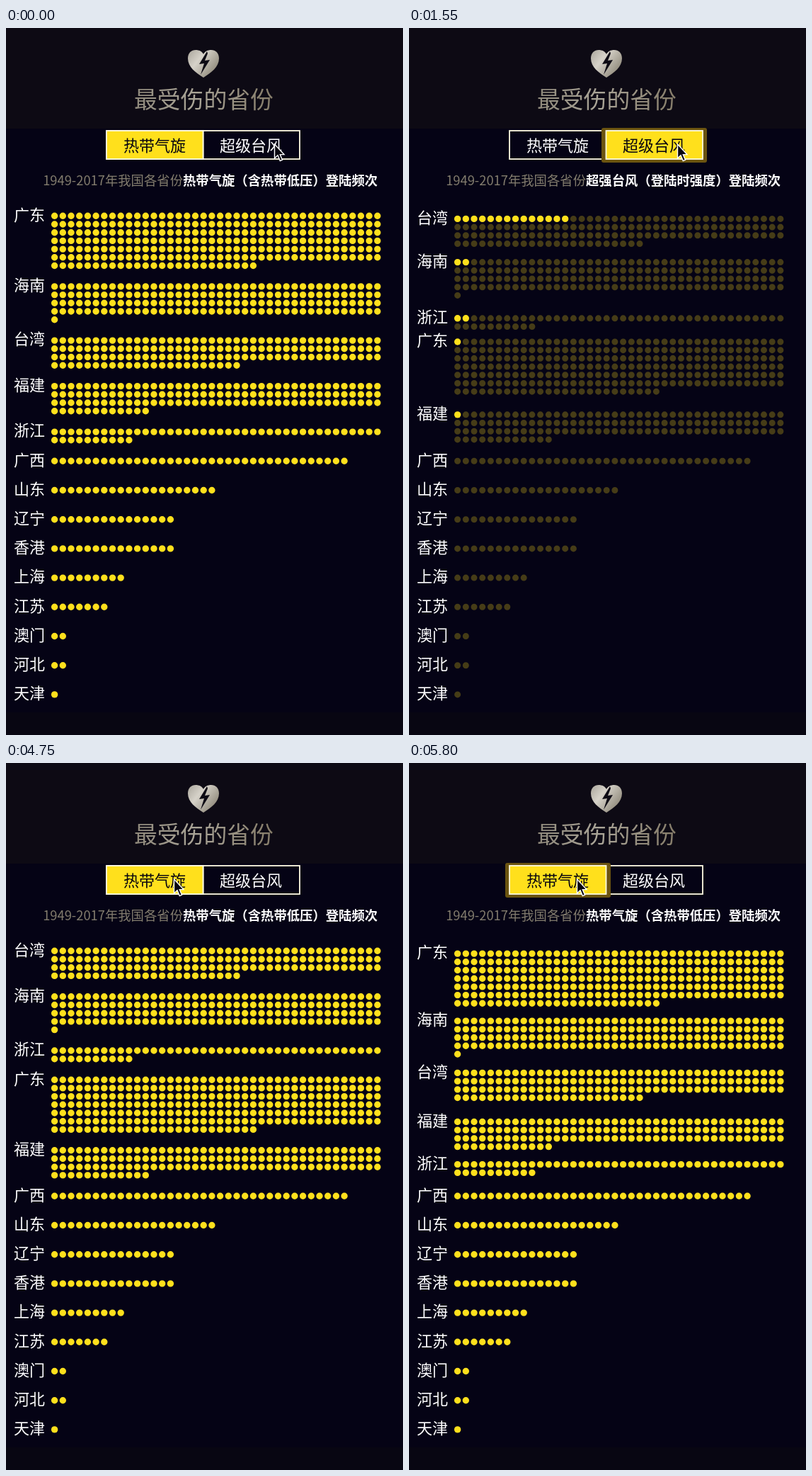
Animation of 561 by 998 pixels, one loop 7.8 s. Source, as an HTML page:

```html
<!DOCTYPE html>
<html lang="zh-CN">
<head>
<meta charset="utf-8">
<title>最受伤的省份</title>
<style>
  html, body { margin: 0; width: 100%; height: 100%; overflow: hidden; background: #050315; }
  svg { display: block; width: 100%; height: 100%; }
  text { font-family: "Noto Sans CJK SC", "Noto Sans CJK", "Noto Sans", sans-serif; font-size: 22px; fill: #fff; }
  .title { font-size: 32.8px; fill: url(#silver); }
  .tab { font-weight: 500; text-anchor: middle; }
  .years { font-size: 18.35px; fill: #827c6d; text-anchor: end; }
  .topic { font-size: 18.35px; font-weight: 700; }
  .box { fill: #050315; stroke: #fffbe2; stroke-width: 1.8; }
  .glow { fill: #6b5410; }
  .dots { fill: none; stroke: #ffe01c; stroke-linecap: round; stroke-width: 9.4; }
  .dim { stroke-opacity: .26; stroke-width: 9; }
</style>
</head>
<body>
<svg viewBox="0 0 561 998" preserveAspectRatio="none">
  <defs>
    <linearGradient id="silver">
      <stop offset="0" stop-color="#8f897b"/>
      <stop offset=".45" stop-color="#aaa598"/>
      <stop offset="1" stop-color="#857c69"/>
    </linearGradient>
    <linearGradient id="metal" x2="1" y2=".7">
      <stop offset="0" stop-color="#aaa69c"/>
      <stop offset=".4" stop-color="#d6d2c9"/>
      <stop offset="1" stop-color="#8b8576"/>
    </linearGradient>
  </defs>
  <rect width="561" height="998" fill="#050315"/>
  <rect width="561" height="142" fill="#0d0a14"/>
  <rect y="966" width="561" height="32" fill="#080612"/>

  <path fill="url(#metal)" d="M279 70C268 63 257 55 257 43C257 35 262 31 268 31C273 31 277 33 279 37C281 33 285 31 290 31C296 31 301 35 301 43C301 55 290 63 279 70Z"/>
  <path fill="#0d0a14" d="M284 33L273 51L280 50L275 66L288 45L281 46L285 36Z"/>
  <text class="title" x="181" y="113">最受伤的省份</text>

  <rect class="box" x="142" y="145" width="136.5" height="40"/>
  <rect class="box" x="278.5" y="145" width="136.5" height="40"/>
  <rect class="glow" id="glow" y="141" width="149" height="49" rx="3"/>
  <rect class="box" id="active" y="145" width="136.5" height="40" style="fill:#ffe01c"/>
  <text class="tab" id="tab0" x="210" y="174">热带气旋</text>
  <text class="tab" id="tab1" x="346" y="174">超级台风</text>

  <text class="years" x="250" y="222">1949-2017年我国各省份</text>
  <text class="topic" id="topic" x="250" y="222"></text>

  <g id="rows"></g>
  <path id="cursor" d="M0 0V20L4.5 15.8L7.8 23.6L11 22.2L7.8 14.6H13.5Z" fill="#08060f" stroke="#fff" stroke-width="1.4"/>
</svg>
<script>
const LOOP = 7800, STEP = 50, COLS = 40, PITCH = 11.7;
const TO_SUPER = 500, TO_ALL = 4750, FOCUS_LAG = 200;
const TOPICS = ['热带气旋（含热带低压）登陆频次', '超强台风（登陆时强度）登陆频次'];

// name, all landfalls, super typhoons
const rows = [
  ['广东', 265, 1], ['海南', 161, 2], ['台湾', 143, 14], ['福建', 132, 1], ['浙江', 50, 2],
  ['广西', 36, 0], ['山东', 20, 0], ['辽宁', 15, 0], ['香港', 15, 0], ['上海', 9, 0],
  ['江苏', 7, 0], ['澳门', 2, 0], ['河北', 2, 0], ['天津', 1, 0]
].map(([name, all, top]) => ({ name, all, top }));

const $ = id => document.getElementById(id);

function add(parent, tag, attrs) {
  const el = document.createElementNS('http://www.w3.org/2000/svg', tag);
  for (const key in attrs) el.setAttribute(key, attrs[key]);
  return parent.appendChild(el);
}

// Round-capped zero-length dashes make the dots
function dots(parent, from, to, cls) {
  let d = '';
  for (let i = from; i < to;) {
    const line = Math.floor(i / COLS), end = Math.min(to, (line + 1) * COLS);
    d += `M${68.6 + (i % COLS) * PITCH} ${line * PITCH}h${(end - i - 1) * PITCH + 1}`;
    i = end;
  }
  return add(parent, 'path', { class: cls, d, 'stroke-dasharray': `0 ${PITCH}` });
}

function layout(order, key) {
  let y = 265.3;
  for (const row of order) {
    row[key] = y;
    y += Math.max(41.2, 17.7 + PITCH * Math.ceil(row.all / COLS));
  }
}

layout(rows, 'yAll');
layout([2, 1, 4, 0, 3, 5, 6, 7, 8, 9, 10, 11, 12, 13].map(i => rows[i]), 'ySuper');

for (const row of rows) {
  row.el = add($('rows'), 'g', {});
  row.rest = dots(row.el, row.top, row.all, 'dots');
  dots(row.el, 0, row.top, 'dots');
  add(row.el, 'text', { x: 11, y: 6.3 }).textContent = row.name;
}

const clamp = x => Math.max(0, Math.min(1, x));
const settle = (t, start) => t < start ? 0 : 1 - Math.exp(-(t - start) / 266);

function draw(t) {
  const tab = t >= TO_SUPER && t < TO_ALL ? 1 : 0;
  const p = t < TO_ALL ? settle(Math.min(t, 1950), 550)
                       : 1 - settle(Math.min(t, 5800), 4771);
  for (const row of rows) {
    const y = row.yAll + (row.ySuper - row.yAll) * p;
    row.el.setAttribute('transform', `translate(0 ${y.toFixed(2)})`);
    row.rest.classList.toggle('dim', tab === 1);
  }

  $('active').setAttribute('x', tab ? 278.5 : 142);
  $('tab0').style.fill = tab ? '#fff' : '#08060f';
  $('tab1').style.fill = tab ? '#08060f' : '#fff';
  $('topic').textContent = TOPICS[tab];

  const focused = t >= TO_ALL ? t >= TO_ALL + FOCUS_LAG : t >= TO_SUPER + FOCUS_LAG;
  $('glow').setAttribute('x', tab ? 272 : 136);
  $('glow').style.display = focused ? '' : 'none';

  const u = clamp((t - 3900) / 800);
  const x = 379.5 - 142 * u, y = 164 - 4 * Math.sin(Math.PI * u);
  $('cursor').setAttribute('transform', `translate(${x} ${y})`);
}

function tick() {
  const t = performance.now() % LOOP;
  draw(Math.floor(t / STEP) * STEP);
  requestAnimationFrame(tick);
}
tick();
</script>
</body>
</html>
```
